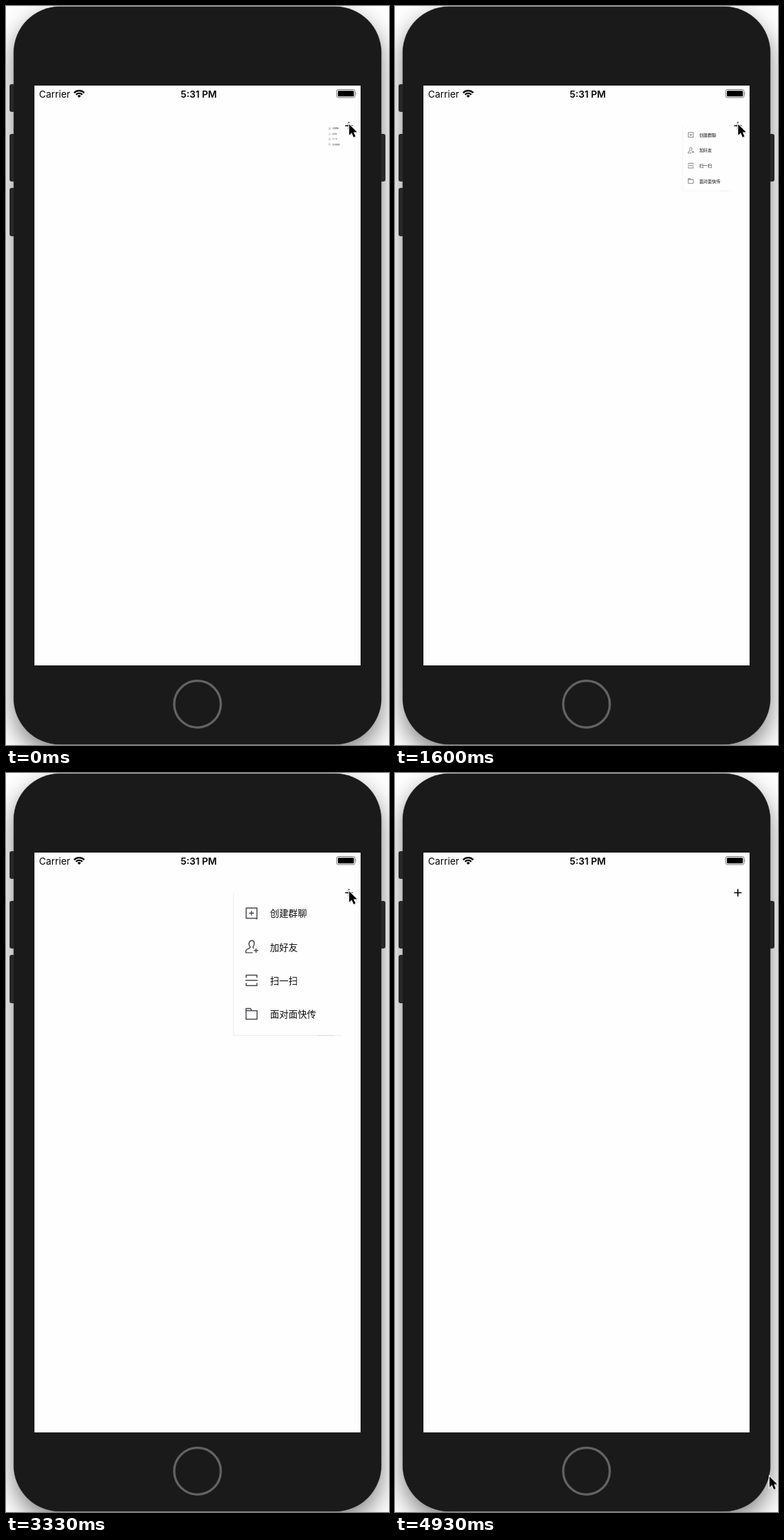
Write an HTML page that moves like this. It is 539 px wide and 1040 px high and loops after 4.99 s.

```html
<!DOCTYPE html>
<html lang="zh">
<head>
<meta charset="utf-8">
<title>Popup menu</title>
<style>
  html, body { margin: 0; width: 539px; height: 1040px; overflow: hidden; background: #fff; }
  .phone, .button, .screen { position: absolute; }
  .phone {
    left: 11px; top: 1px; width: 517px; height: 1038px; border-radius: 65px;
    background: #1a1a1a; box-shadow: 0 0 0 .6px #666, 0 14px 34px rgba(0, 0, 0, .5);
  }
  .button { left: 5px; width: 12px; height: 67.5px; border-radius: 3px; background: #272727; }
  .screen { left: 40px; top: 112px; width: 459px; height: 816px; background: #fefefe; }
  svg { position: absolute; left: 0; top: 0; }
  .status { font: 13.4px Inter, Roboto, sans-serif; }
  .bold { font-weight: 600; text-anchor: middle; }
  .label { font: 14.3px "Noto Sans CJK SC", "Noto Sans CJK", sans-serif; fill: #0c0c0c; }
  .line { fill: none; stroke: #4c4c52; stroke-width: 1.6; stroke-linejoin: round; }

  .menu, .ring, .cursor { animation-play-state: paused !important; }
  .menu {
    animation: grow 1s ease-in-out -.263s both,
               shrink 1s ease-in-out 1.052s forwards,
               grow 1s ease-in-out 2.54s forwards,
               shrink 1s ease-in-out 3.922s forwards;
  }
  .ring {
    visibility: hidden;
    animation: show .13s 1.06s, show .13s 2.53s, show .13s 3.93s;
  }
  .cursor { animation: leave .29s ease-in-out 4.64s forwards; }
  @keyframes grow { from { transform: scale(0); } to { transform: scale(1); } }
  @keyframes shrink { from { transform: scale(1); } to { transform: scale(0); } }
  @keyframes show { from, to { visibility: visible; } }
  @keyframes leave { from { transform: translate(0, 0); } to { transform: translate(44px, 823.5px); } }
</style>
</head>
<body>
<div class="phone"></div>
<div class="button" style="top:110px;height:38.5px"></div>
<div class="button" style="top:179.5px"></div>
<div class="button" style="top:256px"></div>
<div class="button" style="top:179.5px;left:522px"></div>
<div class="phone" style="box-shadow:none"></div>
<div class="screen"></div>

<svg width="539" height="1040" viewBox="0 0 539 1040">
  <circle cx="269.5" cy="982.5" r="32.8" fill="none" stroke="#636363" stroke-width="3.2"/>

  <text class="status" x="46.5" y="128.5">Carrier</text>
  <text class="status bold" x="271.2" y="128.5">5:31 PM</text>
  <g transform="translate(103 129)" fill="none" stroke="#000" stroke-width="2.3">
    <path d="M-7.1 -6.9A9.9 9.9 0 0 1 7.1 -6.9M-4.4 -4.3A6.2 6.2 0 0 1 4.4 -4.3"/>
    <path d="M0 0L-2.5 -2.5A3.5 3.5 0 0 1 2.5 -2.5Z" fill="#000" stroke="none"/>
  </g>
  <rect x="465.3" y="117.5" width="26" height="11.4" rx="2.6" fill="none" stroke="#777"/>
  <rect x="467" y="119.2" width="22.6" height="8" rx="1.2"/>
  <path d="M492.5 121.2Q494 123.2 492.5 125.2Z" fill="#777"/>

  <g transform="translate(476 168)">
    <g class="menu">
      <path d="M-170.7 0V220.6H-4" fill="none" stroke="#ebebeb"/>
      <path d="M-40 220.7H-17" stroke="#dadada"/>
      <g class="line">
        <path transform="translate(-143 32)" d="M-8.2 8V-8H8.4V8.8L6.4 8ZM-3.5 0H3.7M0 -3.6V3.6"/>
        <path transform="translate(-143 83.8)" d="M2 9.2H-8.8V6.6Q-8.6 4.4 -5.6 3.4Q-1.6 2 -2 .4C-5.6 -4 -3.6 -9.6 .6 -9.6C5 -9.6 5.4 -3.6 2.4 0Q1.6 1.4 3.6 2.6M3.6 5.8H10.4M7 2.4V9.2"/>
        <path transform="translate(-143 135.7)" d="M-8.2 -4V-8H8.4V-4M-9.4 0H9.6M-8.2 4V8H8.4V4"/>
        <path transform="translate(-143 187.5)" d="M-8.4 8V-8.4H-1.6L.6 -5H8.6V8ZM-8.4 -5H.6"/>
      </g>
      <g class="label">
        <text x="-114.6" y="37.6">创建群聊</text>
        <text x="-114.6" y="89.4">加好友</text>
        <text x="-114.6" y="141.3">扫一扫</text>
        <text x="-114.6" y="193.1">面对面快传</text>
      </g>
    </g>
  </g>

  <path d="M477.3 168.5H487.7M482.5 163.3V173.7" stroke="#000" stroke-width="1.6"/>

  <g class="ring" fill="none">
    <circle cx="482.5" cy="168" r="24.1" stroke="#fff" stroke-width="3.2"/>
    <circle cx="482.5" cy="168" r="24.1" stroke="#000" stroke-width="1.7"/>
  </g>

  <g class="cursor">
    <g transform="translate(483 166.5)">
      <path d="M0 0V15.2L3.5 12L6.2 18.2L8.8 17.1L6.2 11.1H11Z" fill="#000" opacity=".12" transform="translate(1.2 1.8)"/>
      <path d="M0 0V15.2L3.5 12L6.2 18.2L8.8 17.1L6.2 11.1H11Z" stroke="#fff" stroke-width="2" paint-order="stroke"/>
    </g>
  </g>
</svg>

<script>
  const LOOP = 4990, STEP = 1000 / 15;
  const parts = document.getAnimations();
  const start = performance.now();

  function tick() {
    const time = (performance.now() - start) % LOOP;
    const held = Math.floor((time + 4) / STEP) * STEP;
    for (const part of parts) part.currentTime = held;
    requestAnimationFrame(tick);
  }
  tick();
</script>
</body>
</html>
```
